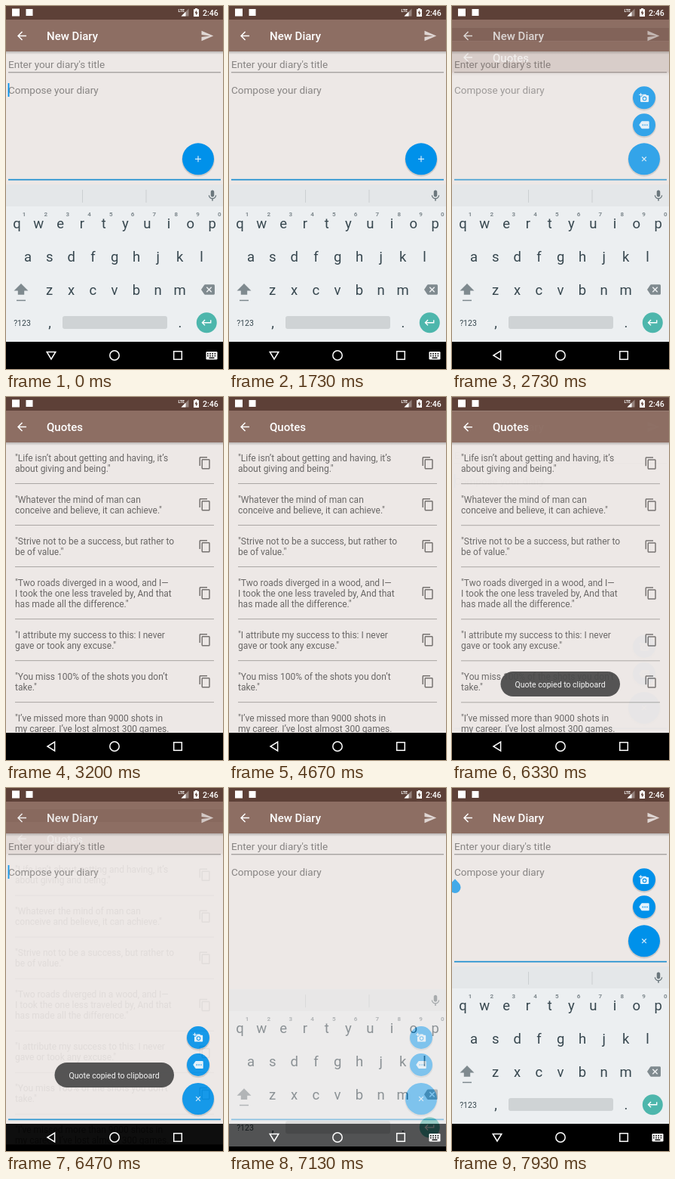
An HTML page that plays this animation: 288 by 480 pixels, repeating every 8 s.

```html
<!DOCTYPE html>
<html lang="en">
<head>
<meta charset="utf-8">
<title>Diary app</title>
<style>
html, body { margin: 0; width: 100%; height: 100%; overflow: hidden; background: #000; }
svg { display: block; width: 100vw; height: 100vh; }
text { font-family: Roboto, sans-serif; white-space: pre; }
.title { font-size: 15px; font-weight: 500; fill: #fff; }
.hint { font-size: 13.5px; fill: #000; fill-opacity: .43; }
.quote { font-size: 12px; fill: #000; fill-opacity: .56; }
.key { font-size: 18.5px; fill: #37474f; text-anchor: middle; }
.digit { font-size: 8px; font-weight: 700; fill: #7f898e; text-anchor: middle; }
</style>
</head>
<body>
<svg id="stage" viewBox="0 0 288 480" xmlns="http://www.w3.org/2000/svg"></svg>
<script>
const LOOP = 8000, TICK = 1000 / 15;
const BLUE = '#0091ea', PAPER = '#ede8e6', BAR = '#8d6e63', STATUS = '#5d4037';

const ICONS = {
  back: 'M20 11H7.83l5.59-5.59L12 4l-8 8 8 8 1.41-1.41L7.83 13H20z',
  send: 'M2 21L23 12 2 3v7l15 2-15 2z',
  copy: 'M16 1H4c-1.1 0-2 .9-2 2v14h2V3h12zM19 5H8c-1.1 0-2 .9-2 2v14c0 1.1.9 2 2 2h11c1.1 0 2-.9 2-2V7c0-1.1-.9-2-2-2zm0 16H8V7h11z',
  mic: 'M12 14c1.66 0 3-1.34 3-3V5c0-1.66-1.34-3-3-3S9 3.34 9 5v6c0 1.66 1.34 3 3 3zm5.3-3c0 3-2.54 5.1-5.3 5.1S6.7 14 6.7 11H5c0 3.41 2.72 6.23 6 6.72V21h2v-3.28c3.28-.48 6-3.3 6-6.72z',
  erase: 'M22 3H7c-.69 0-1.23.35-1.59.88L0 12l5.41 8.11c.36.53.9.89 1.59.89h15c1.1 0 2-.9 2-2V5c0-1.1-.9-2-2-2zm-3 12.59L17.59 17 14 13.41 10.41 17 9 15.59 12.59 12 9 8.41 10.41 7 14 10.59 17.59 7 19 8.41 15.41 12z',
  enter: 'M19 7v4H5.83l3.58-3.59L8 6l-6 6 6 6 1.41-1.41L5.83 13H21V7z',
  photo: 'M3 4V1h2v3h3v2H5v3H3V6H0V4zM6 10V7h3V4h7l1.83 2H21c1.1 0 2 .9 2 2v12c0 1.1-.9 2-2 2H5c-1.1 0-2-.9-2-2V10zM13 9a5 5 0 1 0 0 10a5 5 0 1 0 0-10zm0 1.8a3.2 3.2 0 1 1 0 6.4a3.2 3.2 0 1 1 0-6.4z',
  tag: 'M22 3H7c-.69 0-1.23.35-1.59.88L0 12l5.41 8.11c.36.53.97.89 1.66.89H22c1.1 0 2-.9 2-2V5c0-1.1-.9-2-2-2zM9 10.5a1.5 1.5 0 1 1 0 3a1.5 1.5 0 1 1 0-3zm5 0a1.5 1.5 0 1 1 0 3a1.5 1.5 0 1 1 0-3zm5 0a1.5 1.5 0 1 1 0 3a1.5 1.5 0 1 1 0-3z'
};

const QUOTES = [
  ['"Life isn’t about getting and having, it’s', 'about giving and being."'],
  ['"Whatever the mind of man can', 'conceive and believe, it can achieve."'],
  ['"Strive not to be a success, but rather to', 'be of value."'],
  ['"Two roads diverged in a wood, and I—', 'I took the one less traveled by, And that', 'has made all the difference."'],
  ['"I attribute my success to this: I never', 'gave or took any excuse."'],
  ['"You miss 100% of the shots you don’t', 'take."'],
  ['"I’ve missed more than 9000 shots in', 'my career. I’ve lost almost 300 games.']
];

const rect = (x, y, w, h, fill, more = '') =>
  `<rect x="${x}" y="${y}" width="${w}" height="${h}" fill="${fill}" ${more}/>`;
const text = (x, y, s, cls, more = '') =>
  `<text x="${x}" y="${y}" class="${cls}" ${more}>${s}</text>`;
const icon = (name, x, y, fill, k = .75) =>
  `<path d="${ICONS[name]}" fill="${fill}" fill-rule="evenodd" transform="translate(${x} ${y}) scale(${k}) translate(-12 -12)"/>`;

function header(title) {
  return rect(0, 60, 288, 4, 'url(#shade)') + rect(0, 0, 288, 18, STATUS) +
    rect(0, 18, 288, 42, BAR) + icon('back', 21, 39.5, '#fff') + text(54, 45.2, title, 'title');
}

function disc(r) {
  return `<circle cy="1.4" r="${r + .8}" fill="#000" opacity=".13"/><circle r="${r}" fill="${BLUE}"/>`;
}

function diary() {
  return rect(0, 0, 288, 444, PAPER) + header('New Diary') + icon('send', 267, 39.5, '#dfd6d3') +
    text(3, 82.2, 'Enter your diary\'s title', 'hint') + rect(3, 87.3, 282, 1, '#8b8786') +
    text(3, 116.3, 'Compose your diary', 'hint') +
    rect(2.6, 102, 1.8, 18, BLUE, 'id="cursor"') +
    `<path id="handle" d="M4 120.3L9.4 126A7.6 7.6 0 1 1 -1.4 126Z" fill="${BLUE}"/>` +
    `<g id="lower">${rect(3, 228.8, 282, 1.7, '#1e8fd0')}
      <g id="mini1">${disc(15)}${icon('photo', 0, 0, '#e3f3fd', .56)}</g>
      <g id="mini0">${disc(15)}${icon('tag', 0, 0, '#e3f3fd', .56)}</g>
      <g transform="translate(255 202.3)">${disc(21)}
        <path id="plus" d="M-4 0H4M0-4V4" stroke="#d6edfb" stroke-width="1.2"/></g></g>`;
}

function quoteList() {
  let y = 60, out = '';
  for (const lines of QUOTES) {
    const h = 26.8 + 14.1 * lines.length;
    lines.forEach((s, i) => out += text(12, y + 24.6 + 14.1 * i, s, 'quote'));
    if (y < 400) out += icon('copy', 264, y + h / 2 - .3, '#777371') + rect(12, y + h - 1, 264, 1, '#aaa6a4');
    y += h;
  }
  return out;
}

function quotes() {
  return rect(0, 0, 288, 444, PAPER) + rect(0, 444, 288, 36, '#000') +
    `<g id="list" clip-path="url(#page)">${quoteList()}</g>` + header('Quotes');
}

function keyboard() {
  let out = rect(0, 236, 288, 208, '#eceff1') + rect(0, 236, 288, 29, '#e4e7e9') +
    rect(0, 444, 288, 36, '#000') +
    rect(101, 243, 1, 17, '#cbcfd1') + rect(185.5, 243, 1, 17, '#cbcfd1') + icon('mic', 274, 251, '#6b777d');
  [['qwertyuiop', 14.5], ['asdfghjkl', 29], ['zxcvbnm', 57.7]].forEach(([row, x], r) => {
    [...row].forEach((c, i) => {
      const cx = x + 28.8 * i;
      out += text(cx, 293.5 + 44 * r, c, 'key');
      if (!r) out += text(cx + 9.6, 278, (i + 1) % 10, 'digit');
    });
  });
  return out +
    '<path d="M20 367l9.5 9.5h-5.3v5.3h-8.4v-5.3h-5.3z" fill="#7f8a8f"/>' + rect(14, 388.6, 12, 1.5, '#7f8a8f') +
    icon('erase', 268, 375, '#7f8a8f') +
    text(21.5, 422.8, '?123', 'key', 'style="font-size:10.5px"') +
    text(58, 425, ',', 'key') + text(231, 425, '.', 'key') +
    rect(75, 410, 139, 17, '#cfd3d5', 'rx="3"') +
    '<circle cx="266.3" cy="418.7" r="13.5" fill="#4db6ac"/>' + icon('enter', 266.3, 418.7, '#fff', .68);
}

function statusIcons() {
  return rect(8, 3.5, 10, 10, '#fff') + rect(26.5, 4, 9, 9, '#fff') +
    text(228.5, 8, 'LTE', '', 'font-size="5.2" font-weight="700" fill="#fff"') +
    '<path d="M242.5 3.5V13.5H232.5Z" fill="#fff" opacity=".35"/><path d="M238.5 7.5V13.5H232.5Z" fill="#fff"/>' +
    '<path d="M251 3h3v1.2h2V14h-7V4.2h2z" fill="#fff"/>' +
    `<path d="M253 5.6l-2.5 4h1.7v3l2.5-4H253z" fill="${STATUS}"/>` +
    text(261, 13, '2:46', '', 'font-size="10.6" font-weight="500" fill="#fff"');
}

function navIcons() {
  const keys = [0, 1, 2, 3].map(i => rect(267 + 3.2 * i, 459, 1.6, 1.6, '#000') +
    rect(267 + 3.2 * i, 461.8, 1.6, 1.6, '#000')).join('');
  return `<g fill="none" stroke="#fff" stroke-width="1.5">
      <path id="navBack" d="M-5.8-4.6H5.8L0 5Z"/>
      <circle cx="144" cy="462" r="6.2"/><rect x="222.7" y="456.7" width="10.6" height="10.6"/></g>
    <g id="navKeys">${rect(265.5, 457, 15, 10.5, '#fff', 'rx="1.3"')}${keys}${rect(269.5, 464.6, 7, 1.4, '#000')}</g>`;
}

const stage = document.getElementById('stage');
stage.innerHTML = `<defs>
    <linearGradient id="shade" x2="0" y2="1"><stop stop-color="#000" stop-opacity=".22"/><stop offset="1" stop-opacity="0"/></linearGradient>
    <clipPath id="page"><rect width="288" height="444"/></clipPath>
  </defs>
  ${rect(0, 0, 288, 480, '#000')}
  <g>${diary()}</g>
  <g id="quotes">${quotes()}</g>
  <g id="keyboard">${keyboard()}</g>
  ${rect(0, 444, 288, 36, '#000', 'opacity=".35"')}
  ${navIcons()}${statusIcons()}
  <g id="toast">${rect(64.5, 363, 158.5, 33, '#4a4a4a', 'rx="16.5" opacity=".93"')}
    ${text(143.6, 383.5, 'Quote copied to clipboard', '', 'font-size="10.5" fill="#f5f5f5" text-anchor="middle"')}</g>`;

const el = {};
stage.querySelectorAll('[id]').forEach(n => el[n.id] = n);

const clamp = v => Math.max(0, Math.min(1, v));
const span = (t, from, ms) => clamp((t - from) / ms);
const fade = (n, a) => {
  n.setAttribute('opacity', a);
  n.setAttribute('display', a > 0 ? 'inline' : 'none');
};
const move = (n, s) => n.setAttribute('transform', s);
const overshoot = p => 1 + 3 * (p - 1) ** 3 + 2 * (p - 1) ** 2;

function cursorOn(t) {
  if (t < 2600) return t < 500 || (t > 1040 && t < 1510) || (t > 2040 && t < 2510);
  return (t > 6230 && t < 6730) || (t > 7230 && t < 7700);
}

function draw(t) {
  fade(el.cursor, cursorOn(t) ? 1 : 0);
  fade(el.handle, span(t, 7740, 270));

  // button menu
  move(el.plus, `rotate(${135 * overshoot(span(t, 1800, 300))})`);
  [157.3, 121.3].forEach((y, i) => {
    const p = span(t, 1800 + 60 * i, 220);
    fade(el['mini' + i], p > 0 ? 1 : 0);
    move(el['mini' + i], `translate(255 ${y}) scale(${overshoot(p)})`);
  });

  // quotes page slides up in, drops out
  const enter = span(t, 2700, 350), leave = span(t, 6230, 250);
  fade(el.quotes, t < 6000 ? span(t, 2700, 155) : 1 - span(t, 6330, 150));
  move(el.quotes, `translate(0 ${38.4 * (t < 6000 ? (1 - enter) ** 3 : leave ** 6)})`);
  fade(el.list, t > 2780 ? 1 : 0);

  // keyboard
  const hide = span(t, 2740, 200), show = span(t, 7080, 200);
  fade(el.keyboard, t < 5000 ? 1 - hide : clamp(show * 2));
  move(el.keyboard, `translate(0 ${48 * (t < 5000 ? hide ** 1.5 : (1 - show) ** 1.5)})`);
  move(el.lower, `translate(0 ${t > 2900 && t < 7190 ? 208.7 : 0})`);

  const typing = t < 2700 || t > 7050;
  move(el.navBack, `translate(60 462) rotate(${typing ? 0 : 90})`);
  fade(el.navKeys, typing ? 1 : 0);

  fade(el.toast, Math.min(span(t, 4700, 430), 1 - span(t, 6480, 390)));
}

const start = performance.now();
function loop() {
  const t = (performance.now() - start) % LOOP;
  draw(Math.floor((t + 3.5) / TICK) * TICK);
  requestAnimationFrame(loop);
}
loop();
</script>
</body>
</html>
```
